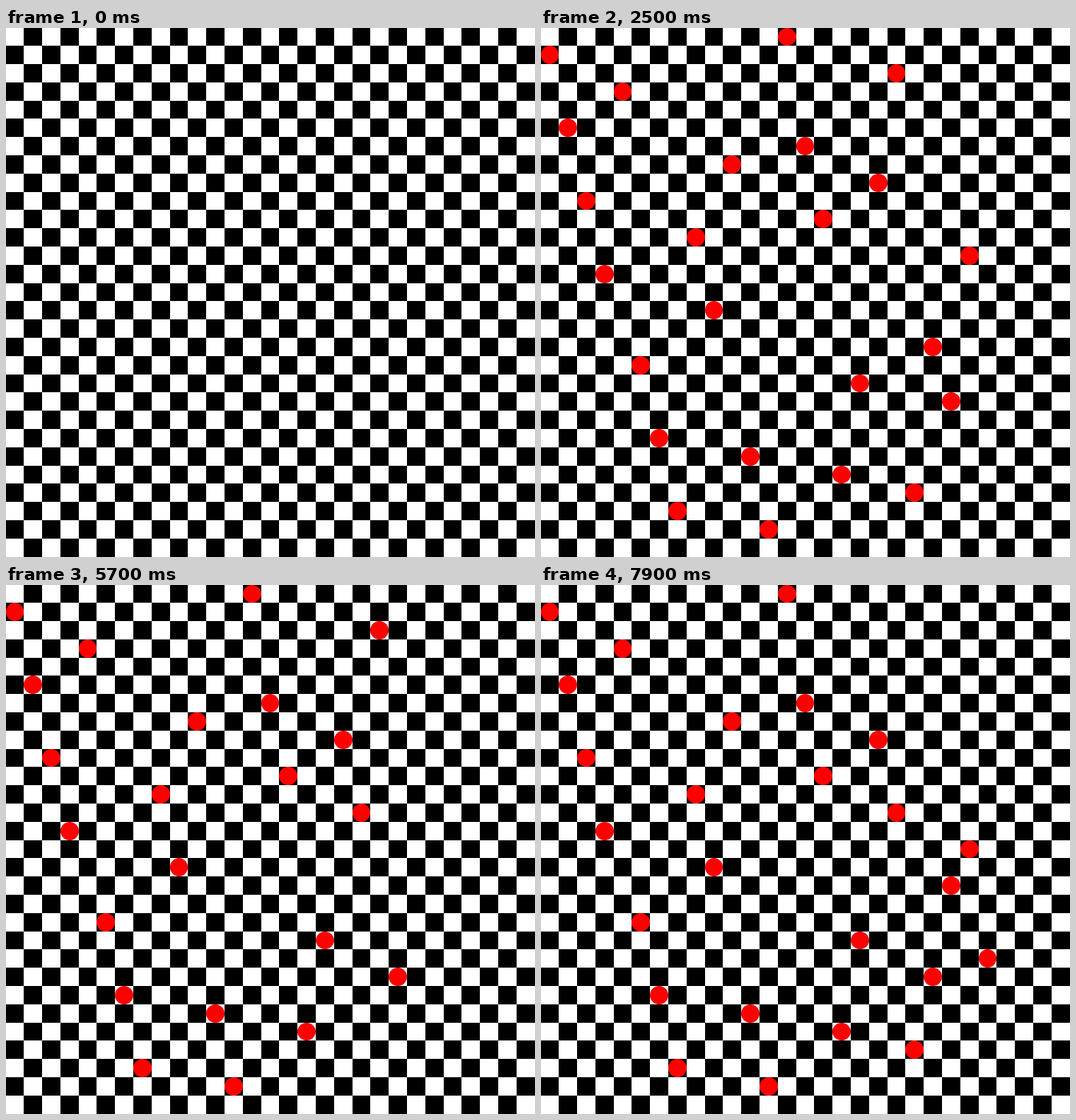
An HTML page with a canvas that plays this animation: 748x748 px, repeating every 8000 ms.

```html
<!DOCTYPE html>
<html lang="en">
<head>
<meta charset="utf-8">
<title>Queens backtracking</title>
<style>
html, body { margin: 0; width: 100%; height: 100%; overflow: hidden; background: #fff; }
canvas { display: block; width: 748px; height: 748px; }
</style>
</head>
<body>
<canvas id="board" width="748" height="748"></canvas>
<script>
const SIZE = 748, N = 29, STEP = 100, STEPS = 80;
const ctx = document.getElementById('board').getContext('2d');
const edge = i => Math.floor(i * SIZE / N);

const isFree = (queens, col, row) =>
  queens.every((r, c) => r !== row && Math.abs(r - row) !== col - c);

function freeRows(queens) {
  const rows = [];
  for (let row = 0; row < N; row++) {
    if (isFree(queens, queens.length, row)) rows.push(row);
  }
  return rows;
}

// Depth-first search; rows leaving the fewest choices in the next column go first.
function search(queens, states) {
  if (queens.length === N) return;
  const options = freeRows(queens)
    .map(row => [...queens, row])
    .map(next => ({ next, left: freeRows(next).length }))
    .sort((a, b) => a.left - b.left);
  for (const { next } of options) {
    if (states.length >= STEPS) return;
    states.push(next);
    search(next, states);
  }
}

const states = [[]];
search([], states);

function drawBoard() {
  ctx.fillStyle = '#fff';
  ctx.fillRect(0, 0, SIZE, SIZE);
  ctx.fillStyle = '#000';
  for (let row = 0; row < N; row++) {
    for (let col = (row + 1) % 2; col < N; col += 2) {
      const x = edge(col), y = edge(row);
      ctx.fillRect(x, y, edge(col + 1) - x, edge(row + 1) - y);
    }
  }
}

function drawQueen(row, col) {
  const x0 = edge(col), x1 = edge(col + 1);
  const y0 = edge(row), y1 = edge(row + 1);
  ctx.beginPath();
  ctx.ellipse((x0 + x1) / 2, (y0 + y1) / 2, (x1 - x0) / 2, (y1 - y0) / 2, 0, 0, Math.PI * 2);
  ctx.fill();
}

let shown = -1;
function render() {
  const step = Math.floor(performance.now() / STEP) % STEPS;
  if (step !== shown) {
    shown = step;
    drawBoard();
    ctx.fillStyle = '#f00';
    states[step].forEach(drawQueen);
  }
  requestAnimationFrame(render);
}
render();
</script>
</body>
</html>
```
